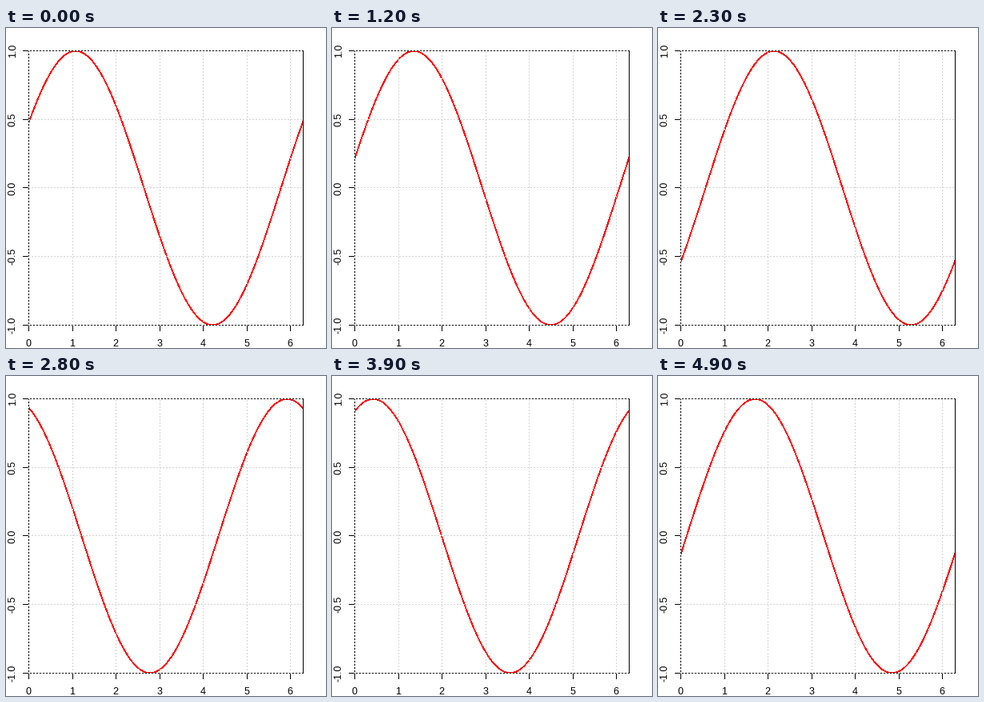
A matplotlib script for the animation above (5000 ms loop, 400 px wide and 400 px high).

```python
import numpy as np
import matplotlib.pyplot as plt
from matplotlib.animation import FuncAnimation
from matplotlib.colors import ListedColormap

SIZE, DPI = 400, 100
PX = 72 / DPI              # one pixel in points
LOW, HIGH = 28.8, 371.2    # plot region in pixels
FRAMES, INTERVAL = 50, 100
PHASE_STEP = 0.5
PEN_RADIUS = 1.0
PEN_SHIFT = 0.25           # the pen favours pixels on its left

plt.rcParams.update({
    "font.family": "Liberation Sans",
    "font.size": 12.5 * PX,
})

fig = plt.figure(figsize=(SIZE / DPI, SIZE / DPI), dpi=DPI, facecolor="white")
ax = fig.add_axes([0, 0, 1, 1])
ax.axis("off")


def to_x(value):
    return LOW + value / (2 * np.pi) * (HIGH - LOW)


def to_y(value):
    return LOW + (1 - value) / 2 * (HIGH - LOW)


def rule(xs, ys, color="black", style="-", zorder=2):
    """Draw a line one pixel wide whose ends lie on pixel edges."""
    ax.plot(xs, ys, color=color, ls=style, lw=PX, zorder=zorder, snap=False,
            solid_capstyle="butt", dash_capstyle="butt")


def hline(x0, x1, row, **kwargs):
    rule([x0, x1], [row + 0.5] * 2, **kwargs)


def vline(y0, y1, column, **kwargs):
    rule([column + 0.5] * 2, [y0, y1], **kwargs)


near, far = int(LOW), int(HIGH)
grid = dict(color="lightgray", style=(0, (2, 2)), zorder=3)

for edge in (near, far):
    hline(near, far + 1, edge)
    vline(near, far + 1, edge)

for value in range(7):
    column = int(to_x(value))
    vline(far, far + 8, column)
    vline(far + 1, near, column, **grid)
    ax.text(column, 398, str(value), ha="center", va="baseline")

for value in (-1.0, -0.5, 0.0, 0.5, 1.0):
    row = int(to_y(value) - 0.01)
    hline(near - 7, near, row)
    hline(near, far, row, **grid)
    ax.text(12, to_y(value), f"{value:.1f}", rotation=90,
            rotation_mode="anchor", ha="center", va="baseline")

# The curve is stroked without smoothing, on whole pixels.
centers = np.arange(near, far + 1) + 0.5
angles = (centers + PEN_SHIFT - LOW) / (HIGH - LOW) * 2 * np.pi
slope_scale = np.pi / 1    # pixel slope of the sine where its cosine is 1


def stroke(phase):
    """Mask everything farther than the pen radius from the sine curve."""
    offset = centers[:, None] - to_y(np.sin(angles + phase))
    distance = np.abs(offset) / np.hypot(1, slope_scale
                                         * np.cos(angles + phase))
    return np.ma.masked_where(distance >= PEN_RADIUS, np.ones(offset.shape))


curve = ax.imshow(stroke(PHASE_STEP), cmap=ListedColormap(["red"]),
                  extent=(near, far + 1, far + 1, near), aspect="auto",
                  interpolation="nearest", zorder=1)
ax.set(xlim=(0, SIZE), ylim=(SIZE, 0))


def update(frame):
    curve.set_data(stroke(PHASE_STEP * (frame + 1)))
    return curve,


animation = FuncAnimation(fig, update, frames=FRAMES, interval=INTERVAL,
                          repeat=True)
plt.show()
```
